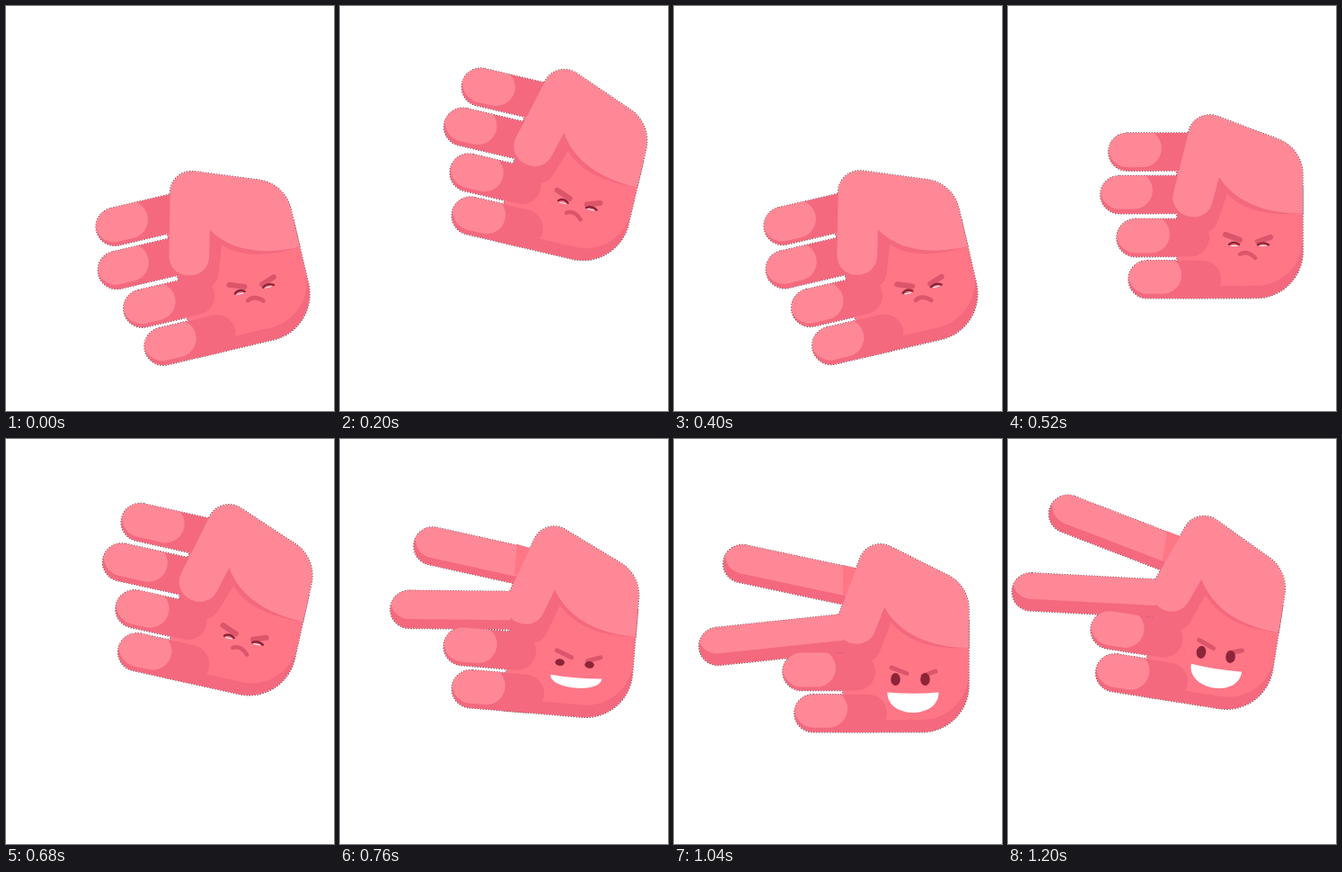
These frames come from a looping animation (365 px wide and 450 px high, 1240 ms). An HTML page with a canvas:

```html
<!DOCTYPE html>
<html lang="en">
<head>
<meta charset="utf-8">
<title>Rock, scissors</title>
<style>
html, body { margin: 0; width: 100%; height: 100%; overflow: hidden; background: #fff; }
canvas { display: block; width: 365px; height: 450px; }
</style>
</head>
<body>
<canvas id="stage" width="365" height="450"></canvas>
<script>
const ctx = document.getElementById('stage').getContext('2d');
const LOOP = 1240, STEP = 40, R = 21;
const LIGHT = '#ff8896', MID = '#ff7687', DARK = '#f4697e';
const BROW = '#db566b', EYE = '#8d2437', EDGE = 'rgba(105,30,45,.8)';

const mix = (a, b, k) => a + (b - a) * k;
const ramp = (t0, t1, t) => Math.min(1, Math.max(0, (t - t0) / (t1 - t0)));
const ease = (t0, t1, t) => (1 - Math.cos(Math.PI * ramp(t0, t1, t))) / 2;

// Wrist angle: one and a half swings from low to high, then down to rest
function wrist(t) {
  const low = 18, period = 402, top = low + period * 1.5;
  const wave = -Math.cos(2 * Math.PI * (Math.min(t, top) - low) / period);
  return 13.8 * wave * (1 - ease(640, 840, t));
}

function fill(path, color) {
  ctx.fillStyle = color;
  ctx.fill(path);
}

function line(d, color, width) {
  ctx.strokeStyle = color;
  ctx.lineWidth = width;
  ctx.stroke(new Path2D(d));
}

function capsule(x0, x1, y) {
  const p = new Path2D();
  p.roundRect(x0, y - R, x1 - x0, R * 2, R);
  return p;
}

// Back of the hand with the thumb; k goes from fist to scissors
function backShape(k) {
  const at = (x0, y0, x1, y1) => [mix(x0, x1, k), mix(y0, y1, k)];
  const crook = at(235, 189, 233, 180);
  const tipRight = at(222, 238, 211, 217), tipLeft = at(179, 227, 166, 212);
  const top = at(208, 112, 227, 97.5), shoulder = at(328, 157.5, 328, 165);
  const p = new Path2D();
  p.moveTo(328, 230);
  p.quadraticCurveTo(260, 229, ...crook);
  p.arcTo(...tipRight, ...tipLeft, R);
  p.arcTo(...tipLeft, ...top, R);
  p.arcTo(...top, ...shoulder, 24);
  p.arcTo(...shoulder, 328, 230, 42);
  p.closePath();
  return p;
}

function shadeShape(k) {
  const low = mix(251, 240, k);
  const p = new Path2D();
  p.moveTo(328, 230);
  p.quadraticCurveTo(269, 234, mix(244, 238, k), mix(208, 194, k));
  p.arcTo(mix(229, 219, k), low, 188, low, 18);
  p.lineTo(188, low);
  p.lineTo(188, 200);
  p.lineTo(mix(235, 233, k), mix(189, 180, k));
  p.closePath();
  return p;
}

// A finger pointing left from its base; pad is the length of the lit part
function finger(x, y, len, angle, pad, drop) {
  const m = new DOMMatrix().translate(x, y).rotate(angle);
  const left = -len - R;
  return { m, body: capsule(left, R, 0), pad: capsule(left, left + pad, -drop) };
}

function drawFinger(f) {
  ctx.save();
  ctx.transform(f.m.a, f.m.b, f.m.c, f.m.d, f.m.e, f.m.f);
  fill(f.body, DARK);
  ctx.clip(f.body);
  fill(f.pad, LIGHT);
  ctx.restore();
}

const palm = new Path2D('M188 180L230 200H328V272A52 52 0 0 1 276 323.7H188Z');
const palmLit = new Path2D('M188 140H328V258A52 52 0 0 1 276 310H188Z');
const knuckle = new Path2D('M188 138L204 142V172H188Z');

function grumpyFace() {
  line('M242 253L258 259M278 261L292 256', BROW, 6);
  line('M248 265.5H255M280 265.5H287', '#fff', 1);
  line('M246 264Q251 259.5 257 264M278 264.5Q284 260.5 290 264.5', EYE, 2.4);
  line('M258 275Q266 270 275 279', BROW, 4.5);
}

function happyFace(k) {
  line('M242 252L259 258.5M277 261L291 256', BROW, 5);
  const eyes = new Path2D();
  for (const x of [246.5, 279.5]) {
    eyes.moveTo(x + 5.3, 265);
    eyes.ellipse(x, 265, 5.3, 7 * k, 0, 0, Math.PI * 2);
  }
  fill(eyes, EYE);
  const low = 280 + 29.5 * k;
  fill(new Path2D(`M237.5 279.5Q266 282 294.5 279.5C295 ${low} 237 ${low} 237.5 279.5Z`), '#fff');
}

function draw(t) {
  const reach = ease(640, 840, t), fold = ease(670, 840, t);
  const spring = ease(680, 880, t) * (1 - ease(880, 1040, t));
  const lunge = ramp(1120, 1200, t);
  const a = wrist(t) + 9 * lunge;
  const curl = mix(spring, fold, .45);
  const slide = 14 * spring;

  const far = [
    finger(205, mix(161, 164, reach), mix(72, 132, reach), 12 * fold + 3.4 * spring,
      mix(59, 175, reach), mix(4, 10, reach)),
    finger(205, mix(208.5, 212, reach), mix(81, 157, reach), -6 * fold - 2.6 * spring,
      mix(58, 200, reach), mix(5, 13, reach))
  ];
  const near = [
    finger(203 - slide, 256.5, 61, 0, 59, 4),
    finger(216 - slide, 302.7, 61, 0, 59, 5)
  ];
  const back = backShape(curl);

  const edge = new Path2D();
  for (const f of [...far, ...near]) edge.addPath(f.body, f.m);
  edge.addPath(palm);
  edge.addPath(back);

  ctx.setTransform(1, 0, 0, 1, 0, 0);
  ctx.fillStyle = '#fff';
  ctx.fillRect(0, 0, 365, 450);
  // The wrist swings on an arc through the resting point
  ctx.translate(266 - .64 * a + .0134 * a * a - 28.6 * lunge,
    275.5 - 3.56 * a + .017 * a * a + 1.5 * fold + 3.5 * lunge);
  ctx.rotate(a * Math.PI / 180);
  ctx.translate(-266, -275);
  ctx.lineCap = 'round';

  ctx.save();
  ctx.lineCap = 'butt';
  ctx.setLineDash([1.5, 1.5]);
  ctx.strokeStyle = EDGE;
  ctx.lineWidth = 1.6;
  ctx.stroke(edge);
  ctx.restore();

  fill(palm, DARK);
  ctx.save();
  ctx.clip(palm);
  fill(palmLit, MID);
  ctx.restore();

  far.forEach(drawFinger);
  if (fold > .5) fill(knuckle, MID);
  fill(shadeShape(curl), DARK);
  near.forEach(drawFinger);
  fill(back, LIGHT);

  if (fold < .5) grumpyFace();
  else happyFace(fold);
}

const start = performance.now();
function tick(now) {
  const t = Math.max(0, now - start) % LOOP;
  draw(Math.floor(t / STEP) * STEP);
  requestAnimationFrame(tick);
}
draw(0);
requestAnimationFrame(tick);
</script>
</body>
</html>
```
